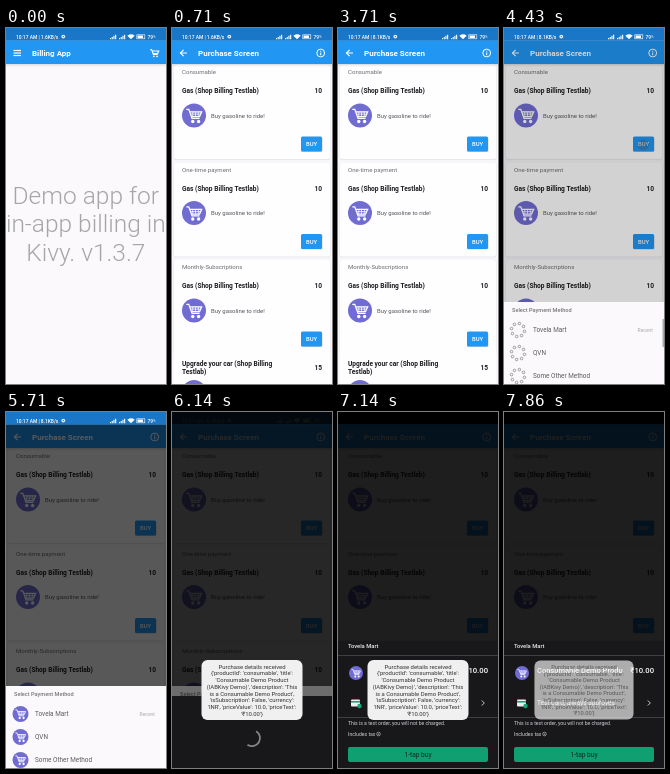
These frames come from a looping animation (160 by 356 pixels, 8 s). An HTML page with a canvas:

```html
<!DOCTYPE html>
<html lang="en">
<head>
<meta charset="utf-8">
<title>Billing demo</title>
<style>
html, body { margin: 0; width: 100%; height: 100%; overflow: hidden; background: #000; }
canvas { display: block; width: 160px; height: 356px; }
</style>
</head>
<body>
<canvas id="stage"></canvas>
<script>
const W = 160, H = 356, LOOP = 8000, STATUS = 12.5;
const BLUE = '#2196f3', DARK_BLUE = '#1a76c6', PURPLE = '#706cd2', PAPER = '#fbf9fc';
const canvas = document.getElementById('stage');
const ctx = canvas.getContext('2d');
const dpr = window.devicePixelRatio || 1;
canvas.width = W * dpr;
canvas.height = H * dpr;

const clamp = v => Math.max(0, Math.min(1, v));
const ramp = (t, a, b) => clamp((t - a) / (b - a));
const easeOut = p => 1 - (1 - p) * (1 - p);

function rect(x, y, w, h, color, r = 0) {
  ctx.fillStyle = color;
  ctx.beginPath();
  ctx.roundRect(x, y, w, h, r);
  ctx.fill();
}

function disc(x, y, r, color) {
  ctx.fillStyle = color;
  ctx.beginPath();
  ctx.arc(x, y, r, 0, 7);
  ctx.fill();
}

function line(points, color, width) {
  ctx.strokeStyle = color;
  ctx.lineWidth = width;
  ctx.beginPath();
  points.forEach(([x, y]) => ctx.lineTo(x, y));
  ctx.stroke();
}

function ring(x, y, r, color, width, from = 0, to = Math.PI * 2) {
  ctx.strokeStyle = color;
  ctx.lineWidth = width;
  ctx.beginPath();
  ctx.arc(x, y, r, from, to);
  ctx.stroke();
}

// y is the middle of the capitals
function text(s, x, y, size, color, weight = 400, align = 'left') {
  ctx.font = `${weight} ${size}px Roboto, sans-serif`;
  ctx.fillStyle = color;
  ctx.textAlign = align;
  ctx.fillText(s, x, y + size * 0.355);
}

function faded(alpha, draw) {
  if (alpha <= 0) return;
  ctx.save();
  ctx.globalAlpha *= alpha;
  draw();
  ctx.restore();
}

function cart(x, y, s, mesh) {
  const w = mesh ? 0.8 : 1.3;
  ctx.save();
  ctx.translate(x, y);
  ctx.scale(s, s);
  line([[-5, -4], [-3.4, -4], [-1.3, 1.8], [3.6, 1.8]], '#fff', w);
  line([[-2.8, -2.4], [5, -2.4], [3.6, 0.7], [-1.8, 0.7]], '#fff', w);
  if (mesh) {
    line([[-2.4, -0.9], [4.4, -0.9]], '#fff', 0.5);
    [-0.8, 1, 2.8].forEach(v => line([[v, -2.4], [v, 0.7]], '#fff', 0.5));
  }
  disc(-0.8, 3.9, 1.1, '#fff');
  disc(3, 3.9, 1.1, '#fff');
  ctx.restore();
}

function badge(x, y, r) {
  disc(x, y, r, PURPLE);
  cart(x, y, r / 7.8, true);
}

function statusBar(t) {
  rect(0, 0, W, STATUS, DARK_BLUE);
  const rate = t < 2140 ? '1.6' : '8.1';
  text(`10:17 AM | ${rate}KB/s`, 10, 8.8, 4.9, '#fff', 500);
  disc(57.3, 8.6, 1.9, '#e8f2fc');
  disc(57.3, 8.6, 0.7, DARK_BLUE);
  [104, 113].forEach(x => {
    for (let i = 0; i < 4; i++) rect(x + i * 1.7, 10 - i * 1.1, 1.1, 1.2 + i * 1.1, '#fff');
  });
  ctx.fillStyle = '#fff';
  ctx.beginPath();
  ctx.moveTo(125, 11.2);
  ctx.arc(125, 11.2, 5, -Math.PI * 0.76, -Math.PI * 0.24);
  ctx.fill();
  ctx.strokeStyle = '#fff';
  ctx.lineWidth = 0.6;
  ctx.strokeRect(130.8, 6.8, 8, 4);
  rect(131.6, 7.5, 5.4, 2.6, '#fff');
  text('79', 141.5, 8.9, 4.9, '#fff', 500);
  text('%', 147, 9.2, 3.6, '#fff');
}

function toolbar(title) {
  const fade = ctx.createLinearGradient(0, 36, 0, 39);
  fade.addColorStop(0, 'rgba(0,0,0,.12)');
  fade.addColorStop(1, 'rgba(0,0,0,0)');
  rect(0, 36, W, 3, fade);
  rect(0, STATUS, W, 36 - STATUS, BLUE);
  text(title, 26, 25, 8, '#fff', 700);
}

function home(t) {
  rect(0, STATUS, W, H, PAPER);
  ['Demo app for', 'in-app billing in', 'Kivy. v1.3.7'].forEach((s, i) =>
    text(s, 79.8, 167 + i * 28.8, 24.5, '#a6a5a8', 300, 'center'));
  toolbar('Billing App');
  [22.5, 25, 27.5].forEach(y => line([[7.5, y], [15, y]], '#fff', 1.2));
  cart(148.5, 25, 0.85);
  const p = ramp(t, 120, 350);
  if (t >= 140) faded(0.25 * (1 - p), () => disc(148.5, 25, 4 + 6 * p, '#fff'));
}

function buyButton(y) {
  rect(129, y - 7, 21.5, 15, 'rgba(0,0,0,.18)', 1.5);
  rect(129, y - 7.5, 21, 15, BLUE, 1.5);
  text('BUY', 139.5, y, 5.9, '#fff', 500, 'center');
}

function card(y, label) {
  rect(1.5, y, 157, 95, 'rgba(0,0,0,.06)', 2);
  rect(2, y, 156, 94, '#fefdff', 2);
  text(label, 10, y + 7, 6.05, '#6c6c6c');
  text('Gas (Shop Billing Testlab)', 10, y + 26, 6.6, '#1e1e1e', 700);
  text('10', 150, y + 26, 6.6, '#1e1e1e', 700, 'right');
  badge(22, y + 50.5, 12);
  text('Buy gasoline to ride!', 39, y + 50.5, 6, '#555');
  buyButton(y + 79);
}

function shop() {
  rect(0, STATUS, W, H, '#f8f6fa');
  ['Consumable', 'One-time payment', 'Monthly-Subscriptions'].forEach((s, i) =>
    card(37 + i * 97.5, s));
  rect(2, 322, 156, 40, '#fefdff');
  text('Upgrade your car (Shop Billing', 10, 336, 6.6, '#1e1e1e', 700);
  text('Testlab)', 10, 343.7, 6.6, '#1e1e1e', 700);
  text('15', 150, 340, 6.6, '#1e1e1e', 700, 'right');
  badge(22, 364, 12);
  toolbar('Purchase Screen');
  line([[15, 25], [8.5, 25]], '#fff', 1.1);
  line([[11.6, 21.8], [8.4, 25], [11.6, 28.2]], '#fff', 1.1);
  ring(148.7, 25, 3.9, '#fff', 1);
  rect(148.2, 24.4, 1, 2.8, '#fff');
  rect(148.2, 22.7, 1, 1, '#fff');
}

function loader(x, y, t) {
  for (let i = 0; i < 8; i++) {
    const a = i * Math.PI / 4 + t / 900;
    ring(x + 6.6 * Math.cos(a), y + 6.6 * Math.sin(a), 1.3, '#777', 0.7);
  }
}

function methodSheet(t) {
  rect(0, 274, W, 82, PAPER);
  text('Select Payment Method', 8, 282.3, 5.6, '#777', 500);
  ['Tovela Mart', 'QVN', 'Some Other Method'].forEach((s, i) => {
    const y = 302 + i * 23;
    if (t < 4850) loader(14, y, t); else badge(14.5, y, 8);
    text(s, 29, y, 6.4, '#5a5a5a');
  });
  text('Recent', 149, 302, 5, '#aaa', 400, 'right');
  faded(1 - ramp(t, 4600, 5300), () => rect(158.5, 291, 1.5, 28, '#aaa'));
}

function order() {
  text('Tovela Mart', 10, 234, 5.8, '#e8eaed', 500);
  [243, 305].forEach(y => rect(0, y, W, 0.8, '#4a4c50'));
  badge(18, 261, 7);
  text('Consumable Demo Produ', 33, 258, 7.5, '#fff', 500);
  text('₹10.00', 150, 258, 7.7, '#fff', 500, 'right');
  rect(13, 287.5, 9, 7, '#eee', 1);
  rect(13, 289, 9, 1.6, '#17a673');
  disc(21.5, 294, 2.2, '#17a673');
  text('Test card, always approves', 33, 291, 6.5, '#fff');
  line([[143.8, 288.5], [146.3, 291], [143.8, 293.5]], '#ddd', 0.9);
  text('This is a test order, you will not be charged.', 10, 311, 5.1, '#d0d2d5');
  text('Includes tax', 10, 322, 5.1, '#d0d2d5');
  ring(40.5, 322, 1.8, '#d0d2d5', 0.6);
  rect(40.2, 321.6, 0.6, 1.5, '#d0d2d5');
  rect(10, 335, 140, 15, '#0f9f70', 2);
  text('1-tap buy', 80, 342.7, 6.6, '#10291f', 400, 'center');
}

function storePanel(t) {
  const rise = easeOut(ramp(t, 5950, 6230));
  const grow = easeOut(ramp(t, 6430, 6560));
  const top = H - 80 * rise - 47 * grow;
  rect(0, top, W, H - top, '#18181b');
  const shown = ramp(t, 6620, 6850);
  faded(rise * (1 - shown), () => {
    const a = (t - 6290) / 160;
    ring(80, top + 42 + 8 * grow, 8, '#8f9296', 1.8, a - 0.1, a + 3.1);
  });
  faded(shown, order);
}

const toastLines = [
  'Purchase details received',
  "{'productId': 'consumable', 'title':",
  "'Consumable Demo Product",
  "(IABKivy Demo)', 'description': 'This",
  "is a Consumable Demo Product',",
  "'isSubscription': False, 'currency':",
  "'INR', 'priceValue': 10.0, 'priceText':",
  "'₹10.00'}"
];

function toast(t) {
  const out = ramp(t, 7760, 8080);
  const scale = 1 - 0.06 * out;
  faded(ramp(t, 5960, 6120) * (1 - out), () => {
    ctx.translate(80, 278);
    ctx.scale(scale, scale);
    ctx.translate(-80, -278);
    rect(29.5, 248, 101, 60, '#f0f0f1', 6);
    toastLines.forEach((s, i) => text(s, 80, 254.7 + i * 6.7, 5.9, '#303032', 400, 'center'));
  });
}

function draw(t) {
  ctx.setTransform(dpr, 0, 0, dpr, 0, 0);
  const slide = easeOut(ramp(t, 200, 620)) * W;
  if (slide < W) {
    ctx.save();
    ctx.translate(-slide, 0);
    home(t);
    ctx.restore();
  }
  if (slide > 0) {
    ctx.save();
    ctx.translate(W - slide, 0);
    ctx.beginPath();
    ctx.rect(0, STATUS, W, H);
    ctx.clip();
    shop();
    ctx.restore();
  }
  if (t >= 4430) {
    const p = ramp(t, 4380, 4850);
    faded(0.35 * (1 - p), () => disc(139.5, 117, 5 + 4 * p, '#555'));
    rect(0, STATUS, W, H, `rgba(0,0,0,${0.17 + 0.48 * ramp(t, 4430, 5000)})`);
    methodSheet(t);
  }
  statusBar(t);
  const dim = ramp(t, 5800, 6200);
  if (dim > 0) {
    rect(0, 0, W, H, `rgba(0,0,0,${0.66 * dim})`);
    faded(dim, () => rect(0, 0, W, STATUS, '#000'));
  }
  if (t > 5950) {
    storePanel(t);
    toast(t);
  }
}

const start = performance.now();
function tick() {
  draw((performance.now() - start) % LOOP);
  requestAnimationFrame(tick);
}
tick();
</script>
</body>
</html>
```
